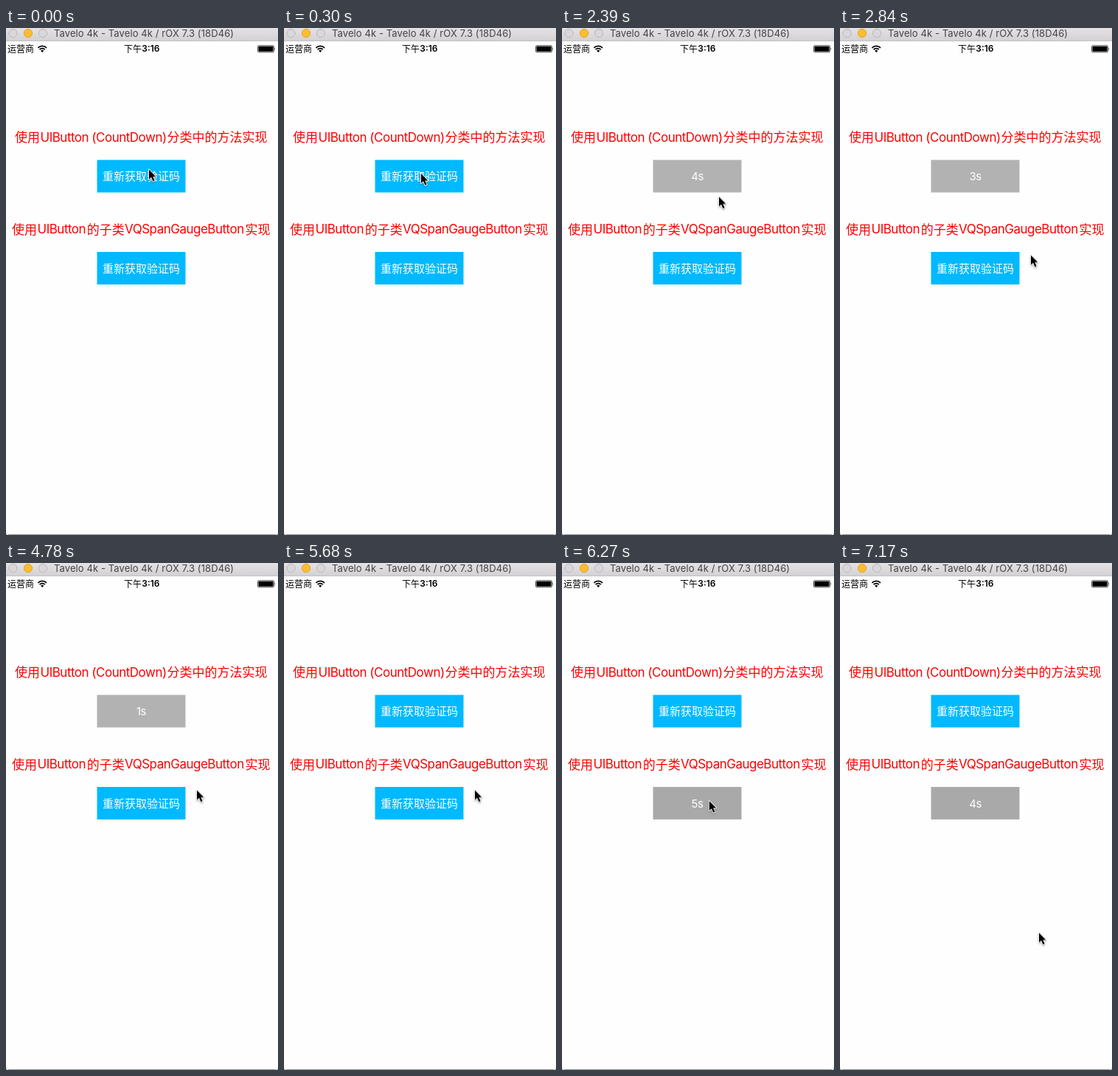
These frames come from a looping animation (369x686 px, 8 s). An HTML page:

```html
<!DOCTYPE html>
<html lang="zh-CN">
<head>
<meta charset="utf-8">
<title>Countdown buttons</title>
<style>
  html, body { margin: 0; width: 100%; height: 100%; overflow: hidden; background: #fefefe; }
  svg { display: block; width: 369px; height: 686px; }
  text { font-family: "Noto Sans CJK SC", "Noto Sans CJK", sans-serif; }
  .latin { font-family: Inter, sans-serif; letter-spacing: -0.5px; }
  .label { font-size: 17px; fill: #f00; }
  .button text { font-size: 15px; fill: #fff; text-anchor: middle; }
  .status { font-size: 12px; fill: #000; }
  .cursor { filter: drop-shadow(0 1px 1px rgba(0, 0, 0, .35)); }
</style>
</head>
<body>
<svg viewBox="0 0 369 686">
  <defs>
    <linearGradient id="bar" x1="0" y1="0" x2="0" y2="1">
      <stop offset="0" stop-color="#e4e2e4"/>
      <stop offset="1" stop-color="#d3d1d3"/>
    </linearGradient>
  </defs>
  <rect width="369" height="686" fill="#fefefe"/>

  <rect width="369" height="17" fill="url(#bar)"/>
  <rect y="17" width="369" height="1" fill="#c4c2c4"/>
  <g stroke-width="1">
    <circle cx="9.5" cy="7" r="5.6" fill="#d9d7d9" stroke="#b9b7b9"/>
    <circle cx="30" cy="7" r="5.6" fill="#fdbd2e" stroke="#e0a32c"/>
    <circle cx="50" cy="7" r="5.6" fill="#d9d7d9" stroke="#b9b7b9"/>
  </g>
  <text class="latin" x="65" y="12" font-size="13" fill="#434243" style="letter-spacing:.1px">Tavelo 4k - Tavelo 4k / rOX 7.3 (18D46)</text>

  <g class="status">
    <text x="2" y="32.6">运营商</text>
    <g fill="none" stroke="#000" stroke-width="1.8">
      <path d="M43.4 26.8a8.2 8.2 0 0 1 11.6 0"/>
      <path d="M45.6 29.2a5.1 5.1 0 0 1 7.2 0"/>
    </g>
    <path d="M49.2 33l-2.1-2.2a3 3 0 0 1 4.2 0z"/>
    <text x="160" y="32.6" font-weight="500">下午</text>
    <text class="latin" x="184.3" y="32.4" font-weight="600" style="letter-spacing:0">3:16</text>
    <rect x="341.5" y="23.8" width="22" height="9" rx="1.6" fill="none" stroke="#000" stroke-width=".7"/>
    <rect x="342.5" y="24.8" width="20" height="7" rx=".8"/>
    <path d="M364.6 26.8q1.6 1.5 0 3z"/>
  </g>

  <g class="label">
    <text x="12" y="154.4">使用</text>
    <text class="latin" x="46.5" y="154">UIButton (CountDown)</text>
    <text x="218.5" y="154.4">分类中的方法实现</text>
    <text x="8" y="278.8">使用</text>
    <text class="latin" x="42.5" y="278.4">UIButton</text>
    <text x="109.7" y="278.8">的子类</text>
    <text class="latin" x="161" y="278.4">VQSpanGaugeButton</text>
    <text x="324.5" y="278.8">实现</text>
  </g>

  <g class="button" id="first"><rect x="123.5" y="178.5" width="120" height="44"/></g>
  <g class="button" id="second"><rect x="123.5" y="303" width="120" height="44"/></g>

  <rect x="3" y="685" width="363" height="1" fill="#8c8c8c"/>
  <path d="M0 683v3h3q-2.4 0-3-3zM369 683v3h-3q2.4 0 3-3z" fill="#8c8c8c"/>

  <g class="cursor" id="cursor">
    <path d="M0 0V13L3 10.3L5.4 15.8L7.7 14.8L5.3 9.5H9.4Z" stroke="#fff" stroke-width="1.8" stroke-linejoin="round" paint-order="stroke"/>
  </g>
</svg>
<script>
const LOOP = 8000;
const BLUE = '#00b9ff';
const REST = '重新获取验证码';

// Each step is [time, value]; a value holds until the next step.
function play(el, prop, steps) {
  const last = steps[steps.length - 1][1];
  const frames = [...steps, [LOOP, last]].map(([time, value]) =>
    ({ offset: time / LOOP, [prop]: value, easing: 'steps(1, end)' }));
  el.animate(frames, { duration: LOOP, iterations: Infinity });
}

function addText(group, content, y) {
  const el = document.createElementNS('http://www.w3.org/2000/svg', 'text');
  el.textContent = content;
  el.setAttribute('x', 183.5);
  el.setAttribute('y', y);
  if (content !== REST) el.setAttribute('class', 'latin');
  group.append(el);
  return el;
}

function countdown(id, baseline, gray, states) {
  const group = document.getElementById(id);
  play(group.querySelector('rect'), 'fill',
    states.map(([time, text]) => [time, text === REST ? BLUE : gray]));
  for (const label of new Set(states.map(s => s[1]))) {
    const el = addText(group, label, baseline);
    play(el, 'opacity', states.map(([time, text]) => [time, text === label ? 1 : 0]));
  }
}

countdown('first', 206.3, '#b2b2b2', [
  [0, REST], [750, '5s'], [1800, '4s'], [2690, '3s'],
  [3740, '2s'], [4780, '1s'], [5680, REST]
]);
countdown('second', 330.8, '#a9a9a9', [
  [0, REST], [6270, '5s'], [7170, '4s']
]);

// Time and tip of the pointer.
const path = [
  [0, 194, 191.6], [150, 185.6, 194], [300, 186, 197],
  [2390, 213, 228.5], [2540, 247, 263.5], [2690, 253, 285.6], [2840, 259, 307.5],
  [5830, 245, 311.5], [5980, 204, 321], [6130, 199.8, 322],
  [6570, 231, 478.5], [6720, 267, 499.5], [6870, 270, 500.5]
];
play(document.getElementById('cursor'), 'transform',
  path.map(([time, x, y]) => [time, `translate(${x}px, ${y}px)`]));
</script>
</body>
</html>
```
